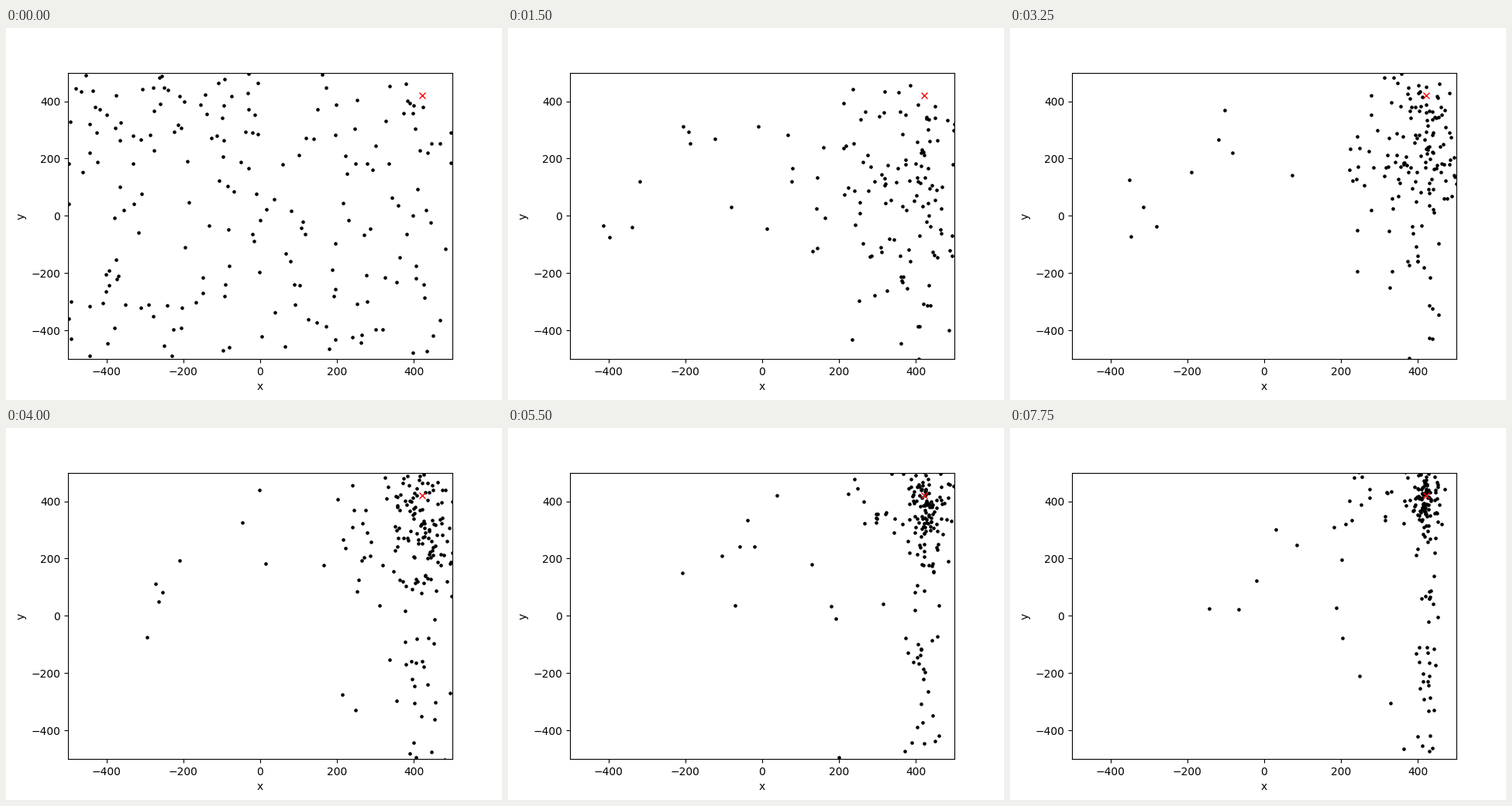
These frames come from a looping animation (640 px wide and 480 px high, 8000 ms). A matplotlib script:

```python
import numpy as np
import matplotlib.pyplot as plt
from matplotlib.animation import FuncAnimation

STEPS = 32
SWARM = 191
SLOW = 9
GOAL = 421

rng = np.random.default_rng(12)

# Swarm: each particle swings about the goal with its own rate and damping.
start = rng.uniform(-500, 500, (SWARM, 2))
rate_x, rate_y = rng.uniform(0.6, 1.05, (2, SWARM))
damp_x = rng.uniform(0.83, 0.91, SWARM)
damp_y = rng.uniform(0.91, 0.955, SWARM)
swing_y = rng.normal(0, 380, SWARM)

# Loose particles keep swinging in y, lagging ones settle left of the goal.
loose = rng.random(SWARM) < 0.36
damp_y[loose] = 0.998
swing_y[loose] *= 2
lag = np.where(rng.random(SWARM) < 0.17, rng.uniform(30, 210, SWARM), 0)

# Slow group: wanders around a center that drifts to the right.
spread = np.column_stack([np.linspace(-170, 170, SLOW),
                          rng.uniform(-230, 230, SLOW)])
wander = rng.uniform(0.15, 0.35, (SLOW, 2))
turn = rng.uniform(0, 2 * np.pi, (SLOW, 2))


def swing(begin, center, extra, rate, damp, n):
    """Damped oscillation about a center, at `begin` when n is 0."""
    phase = rate * n
    return center + (begin * np.cos(phase) + extra * np.sin(phase)) * damp ** n


def center_y(n):
    return np.where(loose, 60, GOAL - 300 * np.exp(-(n / 16) ** 2))


def swarm_at(n, noise):
    shake = min(n / 6, 1)
    center_x = GOAL - lag
    x = swing(start[:, 0] - center_x, center_x, 0, rate_x, damp_x, n)
    y = swing(start[:, 1] - center_y(0), center_y(n), swing_y, rate_y, damp_y, n)
    x += shake * 13 * noise.standard_t(3, SWARM)
    y += shake * 36 * noise.standard_normal(SWARM)
    return np.column_stack([x, y])


def slow_at(n, noise):
    t = n / (STEPS - 1)
    center = np.array([-270 + 400 * t ** 1.7, 120 + 50 * t])
    roam = 80 * np.sin(wander * n + turn)
    return center + spread + roam + 25 * noise.standard_normal(spread.shape)


def positions(n):
    noise = np.random.default_rng(100 + n)
    return np.vstack([swarm_at(n, noise), slow_at(n, noise)])


fig, ax = plt.subplots(figsize=(6.4, 4.8), dpi=100)
ax.set_xlim(-500, 500)
ax.set_ylim(-500, 500)
ax.set_xlabel("x")
ax.set_ylabel("y")
dots, = ax.plot([], [], "ko", markersize=2.3)
ax.plot([GOAL], [GOAL], "rx", markersize=6)


def update(n):
    dots.set_data(*positions(n).T)
    return dots,


anim = FuncAnimation(fig, update, frames=STEPS, interval=250,
                     repeat=True, repeat_delay=0)
plt.show()
```
